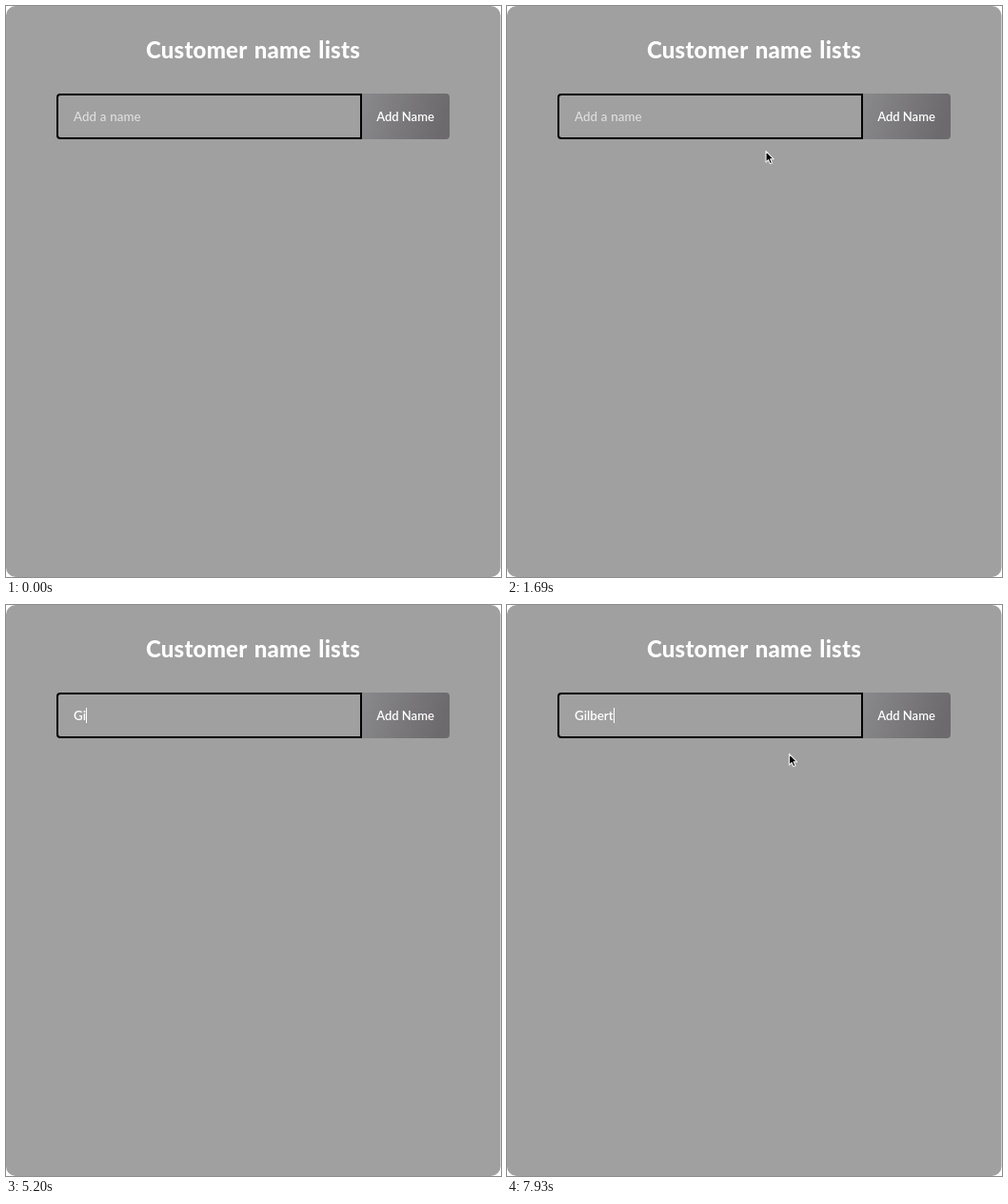
An HTML page for the animation above (8 s loop, 520 by 600 pixels).

```html
<!DOCTYPE html>
<html lang="en">
<head>
<meta charset="utf-8">
<title>Customer name lists</title>
<style>
  html, body { margin: 0; width: 100%; height: 100%; overflow: hidden; background: #fff; }
  svg { display: block; }
  text { font: 600 13.33px Lato, sans-serif; fill: #fff; white-space: pre; }
  .title { font-size: 24px; font-weight: 800; letter-spacing: .2px; word-spacing: .08em; }
  .mid { text-anchor: middle; }
  .label { font-size: 13px; }
  #hint { font-weight: 500; fill: #dfdfe0; word-spacing: .04em; }
</style>
</head>
<body>
<svg width="520" height="600" viewBox="0 0 520 600">
  <defs>
    <linearGradient id="shade" x2="1" y2=".15">
      <stop stop-color="#8a898b"/>
      <stop offset="1" stop-color="#6c6a6c"/>
    </linearGradient>
  </defs>
  <rect width="519.5" height="600" rx="10" fill="#a0a0a1"/>
  <text class="title mid" x="259.5" y="55">Customer name lists</text>
  <path d="M373 92h89a4 4 0 0 1 4 4v40a4 4 0 0 1-4 4h-89z" fill="url(#shade)"/>
  <path d="M373 93v46H57a3 3 0 0 1-3-3V96a3 3 0 0 1 3-3z" fill="none" stroke="#000" stroke-width="2"/>
  <text class="label mid" x="419.5" y="121">Add Name</text>
  <text id="hint" x="71" y="121">Add a name</text>
  <text id="typed" x="71" y="121"></text>
  <rect id="caret" y="108" width="1" height="16" fill="#fff"/>
  <path id="arrow" d="M0 0V11.6L2.6 9.2L4.4 13.3L6.5 12.4L4.7 8.3H8.2Z" fill="#000" stroke="#e8e8e8" stroke-width="1.2" stroke-linejoin="round"/>
  <path id="beam" d="M-3.5-7.5H3.5L-3.5 0H3.5L-3.5 7.5H3.5L-3.5 0H3.5Z" fill="none" stroke="#e4e4e4" stroke-width=".8"/>
</svg>
<script>
const LOOP = 8000, STEP = 130, NAME = "Gilbert";
const $ = id => document.getElementById(id);

// [time, x, y, shape]; no shape hides the pointer
const pointer = [
  [0], [130, 243, 316, "arrow"], [260, 322, 248, "arrow"], [390, 380, 188, "arrow"],
  [520, 396.5, 158, "arrow"], [650, 400, 150, "arrow"], [780, 352, 121, "beam"],
  [910, 305, 112, "beam"], [1040, 287, 110, "beam"], [1170, 279.5, 110, "beam"],
  [1430, 278, 121, "beam"], [1560, 274, 146, "arrow"], [1690, 272, 152.5, "arrow"],
  [3640], [7930, 296.5, 156.5, "arrow"]
];
// [time, number of letters]
const typing = [[0, 0], [4550, 1], [5200, 2], [5980, 3], [6110, 4], [6500, 6], [6630, 7]];
// Times at which the caret switches on or off
const blinks = [1170, 1690, 2210, 2730, 3250, 3770, 4290, 5070, 5200, 5720, 5980, 7150, 7670];

const at = (list, t) => list.filter(k => k[0] <= t).pop();

function draw(now) {
  const t = Math.floor((now % LOOP) / STEP + 1e-6) * STEP;

  const count = at(typing, t)[1];
  $("typed").textContent = NAME.slice(0, count);
  $("hint").style.display = count ? "none" : "";

  const on = blinks.filter(b => b <= t).length % 2;
  $("caret").style.display = on ? "" : "none";
  $("caret").setAttribute("x", 71 + (count ? Math.round($("typed").getComputedTextLength()) : 0));

  const [, x, y, shape] = at(pointer, t);
  for (const id of ["arrow", "beam"]) {
    $(id).style.display = id === shape ? "" : "none";
    if (id === shape) $(id).setAttribute("transform", `translate(${x} ${y})`);
  }
}

const start = performance.now();
function tick() {
  draw(performance.now() - start);
  requestAnimationFrame(tick);
}
tick();
</script>
</body>
</html>
```
